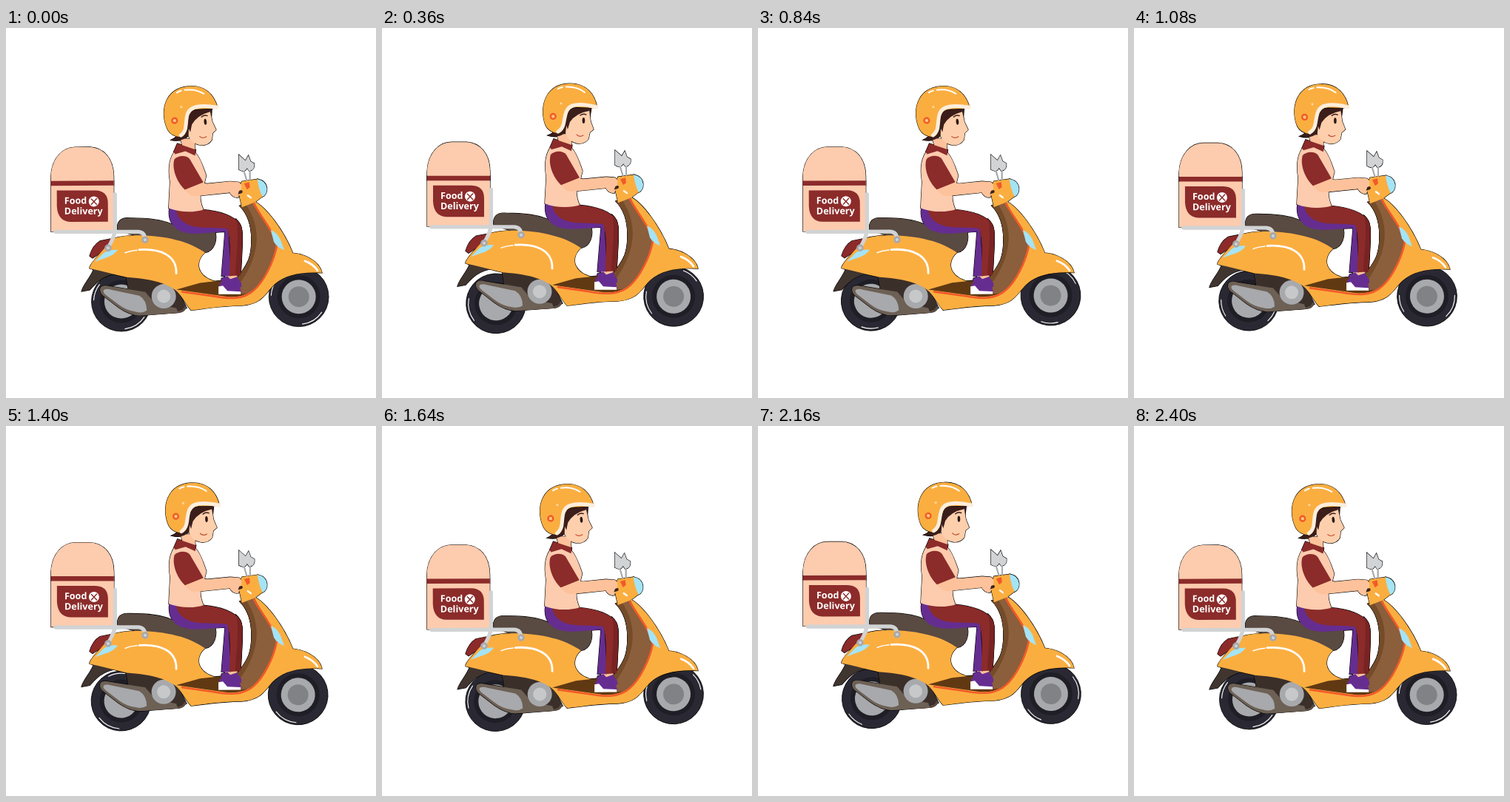
Write an HTML page that moves like this. It is 500 by 500 pixels and loops after 2440 ms.

```html
<!DOCTYPE html>
<html lang="en">
<head>
<meta charset="utf-8">
<title>Food delivery scooter</title>
<style>
html, body { margin: 0; width: 100%; height: 100%; overflow: hidden; background: #fff; }
svg { display: block; width: 100vw; height: 100vh; }
text { font: 700 12.6px "Noto Sans", "Open Sans", sans-serif; fill: #fff; }
.line { fill: none; stroke-linecap: round; stroke-linejoin: round; }
.orange { fill: #fbae40; } .red { fill: #8b2b2a; } .skin { fill: #fdc29b; } .face { fill: #fecfac; }
.pale { fill: #fdcbae; } .purple { fill: #662d91; } .grey { fill: #a7a9ac; }
.silver { fill: #d1d3d4; } .sky { fill: #a4e4f6; } .flame { fill: #f15a29; }
</style>
</head>
<body>
<svg viewBox="0 0 500 500">
  <defs>
    <g id="tyre">
      <circle r="40.4" fill="#2a2933" stroke="#000" stroke-width=".8"/>
      <circle r="29" fill="#1f1e26"/>
      <circle r="23" class="grey"/>
      <g class="line" stroke="#fff" stroke-width="1.1">
        <path d="M-37.3 -2A37.4 37.4 0 0 1 -29.5 -23"/>
        <path d="M31 21A37.4 37.4 0 0 1 5 37"/>
      </g>
    </g>
  </defs>

  <use href="#tyre" id="rear"/>
  <g id="front">
    <use href="#tyre"/>
    <circle r="14" fill="#808285"/>
  </g>

  <!-- stroked copies leave a thin dark rim around the silhouettes -->
  <g stroke="#000" stroke-width="1.2">
    <use href="#bike"/>
    <use href="#head"/>
  </g>

  <g id="bike">
    <!-- engine and exhaust -->
    <path fill="#40352f" d="M114 317L150 325C130 328 122 337 113 347L102 349C104 340 113 332 118 320Z"/>
    <path fill="#3b2f2a" d="M162 328L200 331L230 344L244 372L224 378L190 378L166 352Z"/>
    <path class="line" stroke="#594a42" stroke-width="3" d="M186 380L234 377Q240 376 242 371"/>
    <path fill="#6d6055" d="M128 343Q132 340 139 342L188 350L202 366L230 372L232 378L180 382Q166 381 152 371L130 354Q125 348 128 343Z"/>
    <path class="grey" d="M132 347Q136 345 142 347L180 355Q190 361 190 375Q184 379 176 377Q162 375 152 367L135 354Q130 350 132 347Z"/>
    <circle cx="213" cy="356" r="16.5" class="grey"/>
    <circle cx="213" cy="356" r="9" fill="#c7c8ca"/>

    <!-- seat, tail and body shell -->
    <path fill="#594a42" d="M151 267C149 255 155 249 167 250C190 250 212 253 223 258C242 268 262 268 282 266C287 280 281 295 270 297L245 291L190 278Z"/>
    <path class="red" d="M113 301Q117 287 127 281L142 278L138 290L117 304Z"/>
    <path class="orange" d="M113 316C118 305 134 292 144 278C165 271 205 273 230 280C248 284 259 291 269 297C260 305 258 315 263 323C267 330 274 333 282 336L330 340L352 320L384 298C402 298 424 309 427 325C400 323 378 327 363 340C350 352 347 367 318 369C292 369 268 373 250 375C241 365 238 355 228 347C215 338 195 332 163 330C145 326 128 321 113 318Z"/>
    <path class="orange" d="M336 228C352 236 376 268 388 299C370 306 352 340 335 352L322 345L345 290Z"/>
    <path fill="#603913" d="M230 347L262 338L290 335L320 337L330 350Q320 358 300 357Z"/>
    <path fill="#8b5e3c" d="M316 234L336 229C342 245 362 266 366 287C363 309 349 337 336 347Q326 356 306 352L316 327C325 314 332 306 332 280C332 262 328 246 316 234Z"/>
    <path fill="#754c29" d="M316 234L325 233C345 264 347 303 306 352L300 345L316 327C325 314 332 306 332 280C332 262 328 246 316 234Z"/>
    <path class="line" stroke="#f15a29" stroke-width="2.6" d="M335 231C343 247 362 268 366 288C362 310 348 337 335 348C321 361 302 360 280 356L238 350"/>
    <path class="sky" d="M358 267Q366 270 371 280L376 294Q367 291 362 283Z"/>
    <path class="sky" d="M120 309L132 297Q140 292 151 293Q146 300 137 303Z"/>
    <g class="line" stroke="#fff" stroke-width="2.8">
      <path d="M161 297Q168 294 177 293.5" stroke-width="1.5"/>
      <path d="M180 293C209 291 231 301 230 325"/>
      <path d="M404 309Q415 313 421 322"/>
    </g>

    <!-- handlebar -->
    <g class="line" stroke="#a7a9ac" stroke-width="1.8"><path d="M321 184L326 201M330 184L330 201"/></g>
    <path class="silver" d="M315 165L324 173L328 166L331 174L336 177Q337 186 329 187L326 183Q323 190 315 185Z"/>
    <path class="orange" d="M314 213L319 201L341 198L349 220L337 229L319 236Z"/>
    <path class="sky" d="M340 198Q352 200 353 211Q353 219 347 222Q342 213 340 198Z"/>
    <path class="flame" d="M322 204L329 202L330 209L326 212Z"/>
    <path class="line" stroke="#fff" stroke-width="2.4" d="M327 220L331 223"/>

    <!-- box and rack -->
    <path class="pale" d="M61 268V194C62 168 78 154 94 154H114C132 155 146 169 146 194V268Z"/>
    <path class="red" d="M61 199.5H146V206H61Z"/>
    <path class="red" d="M69 212.5H121Q138 213 138 230V255H87Q70 254 69 234Z"/>
    <text x="79" y="230.6">Food</text>
    <text x="79" y="244.8">Delivery</text>
    <circle cx="119" cy="227.5" r="7" fill="#fff"/>
    <g class="line" stroke="#8b2b2a" stroke-width="1.4"><path d="M115.5 224L122.8 231.5M122.8 223.5L115.5 231.5"/></g>
    <g class="line" stroke="#d1d3d4" stroke-width="5">
      <path d="M67 268.5H178Q188 269 188 279M147.5 218V266Q147 275 138 290"/>
    </g>
    <g class="grey"><circle cx="188" cy="279.5" r="4.8"/><circle cx="138" cy="290.5" r="4.8"/></g>
    <g fill="#d1d3d4"><circle cx="188" cy="279.5" r="2"/><circle cx="138" cy="290.5" r="2"/></g>

    <!-- legs -->
    <path class="skin" d="M294 322H314L311 336H298Z"/>
    <path class="purple" d="M291 332L299 329L303 333L312 330L318 339V344H290Z"/>
    <path class="purple" d="M288 339L303 336L316 344L318 352L290 352Z"/>
    <path fill="#fff" d="M287 343L293 342L299 349L317 350V353.5H287Z"/>
    <path class="purple" d="M221 236L262 239L300 256L304 329L291 329L296 269C270 270 250 275 234 267C222 260 219 249 221 236Z"/>
    <path class="red" d="M230 238L266 239C290 241 310 248 317 260C322 271 318 296 317 328L302 329C302 310 305 282 299 265C285 262 264 266 248 260C236 255 231 248 230 238Z"/>
    <path fill="#792323" d="M311 252Q318 258 319 268Q320 285 317 328H310C311 300 316 270 311 252Z"/>

    <!-- torso and arm -->
    <path class="pale" d="M230 158C221 168 219 183 222 201L220 237C235 243 255 243 267 239C261 225 262 214 268 205L271 193C266 178 261 165 255 161Z"/>
    <path class="skin" d="M241 211L262 202L272 204L303 201L315 202Q320 205 318 212L314 223L307 221L304 216L255 221Q247 220 241 211Z"/>
    <path class="line" stroke="#3b2420" stroke-width="4" d="M308 218L318 215"/>
    <path class="skin" d="M303 211Q313 207 316 212L312 223Q306 222 303 217Z"/>
    <path class="red" d="M228 171C233 165 245 165 249 171L267 202L242 212C231 202 224 183 228 171Z"/>
    <path class="skin" d="M236 143H256V160L240 157Z"/>
    <path class="red" d="M227 161L232 149.5L257 158L256 166L243 160L229 164Z"/>
  </g>

  <g id="head">
    <path fill="#3b1d1a" d="M224 145Q233 142 238 134L250 108L283 108L281 121L258 124L249 140Q240 150 224 145Z"/>
    <path class="face" d="M250 127Q255 117 264 115L280 110L282 126L286 137L281 141L279 150Q274 157 264 156Q251 153 248 142Z"/>
    <path fill="#3b1d1a" d="M248 128L253 109L282 108L280 112Q262 115 254 127L251 137Z"/>
    <ellipse cx="272.5" cy="125" rx="1.8" ry="4" fill="#2b1714"/>
    <path class="line" stroke="#3b1d1a" stroke-width="1.4" d="M268 118Q272 115 276 117"/>
    <path class="line" stroke="#c1492f" stroke-width="1.2" d="M263 144Q267 148 272 145"/>
    <path class="orange" d="M221 131C212 107 221 75 254 75C277 75 288 90 291 108L263 107C250 107 250 119 247 131Q244 142 237 142Q225 140 221 131Z"/>
    <path class="line" stroke="#fdeedd" stroke-width="5" d="M290 107Q268 101 257 105C247 109 248 120 245 131Q243 137 238 140"/>
    <path class="line" stroke="#fff" stroke-width="2" d="M238 82Q241 80.5 244 80M249 79.5Q264 79 274 87"/>
    <circle cx="231.3" cy="119.3" r="4.6" class="flame"/>
    <circle cx="231.3" cy="119.3" r="2.2" fill="#fbc77c"/>
    <circle cx="242" cy="102" r="1.5" fill="#fdd9a0"/>
  </g>
</svg>
<script>
const STEP = 40, STEPS = 61, TURN = 12, BOB = 20;
const part = id => document.getElementById(id);
const rear = part("rear"), front = part("front"), bike = part("bike"), head = part("head");
const rad = Math.PI / 180;

// Each wheel turns about a point slightly off its centre.
function roll(wheel, x, y, r, phase, turn) {
  const a = (phase + turn) * rad;
  wheel.setAttribute("transform",
    `translate(${x + r * Math.cos(a)} ${y + r * Math.sin(a)}) rotate(${turn})`);
}

function draw(ms) {
  const n = Math.floor(ms / STEP) % STEPS;
  const dip = (1 + Math.cos(n / BOB * 2 * Math.PI)) / 2;
  roll(rear, 154, 370.3, 2, -20, n * TURN);
  roll(front, 395, 362.4, 1, 50, n * TURN);
  bike.setAttribute("transform", `translate(0 ${7 * dip}) rotate(${-0.2 * dip} 100 300)`);
  head.setAttribute("transform", `translate(0 ${5 * dip}) rotate(${-5.5 * dip} 238 156)`);
}

const start = performance.now();
function tick() {
  draw(performance.now() - start);
  requestAnimationFrame(tick);
}
draw(0);
tick();
</script>
</body>
</html>
```
